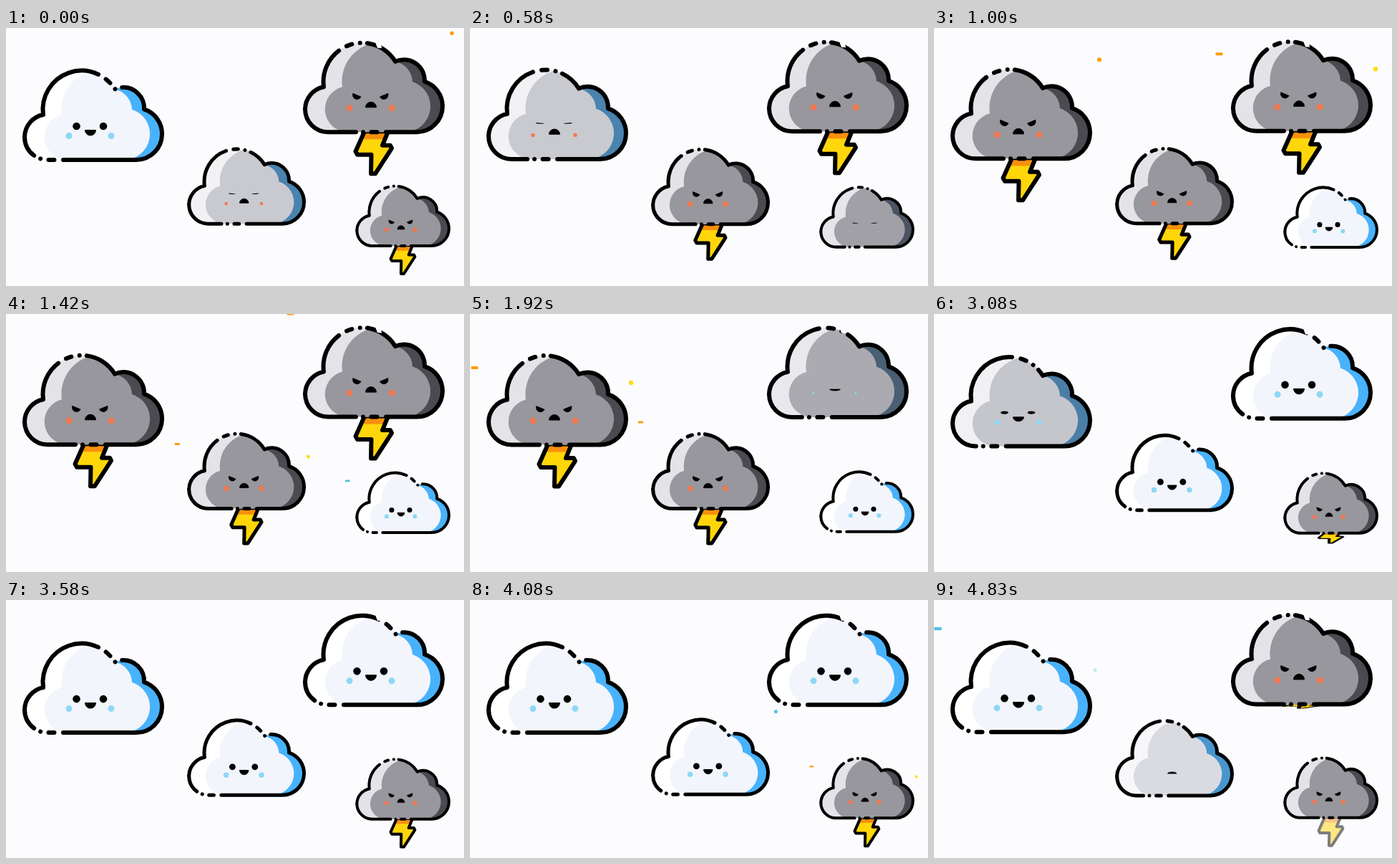
Animation, 640 px wide and 360 px high, one loop 4.91 s. Source, as an HTML page:

```html
<!DOCTYPE html>
<html lang="en">
<head>
<meta charset="utf-8">
<title>Moody clouds</title>
<style>
html, body { margin: 0; width: 100%; height: 100%; overflow: hidden; background: #fcfcfe; }
svg { display: block; width: 100vw; height: 100vh; }
.line { fill: none; stroke: #000; stroke-width: 6; stroke-linecap: round; stroke-linejoin: round; }
</style>
</head>
<body>
<svg id="stage" viewBox="0 0 640 360">
  <defs>
    <clipPath id="body"><path d="M58 185A32 32 0 0 1 52 122A54.2 54.2 0 0 1 152 86.5A29 29 0 0 1 193 114.5A36 36 0 0 1 182 185Z"/></clipPath>
    <path id="zap" d="M109 184H142L134 203.500H145L147 207.500L124 243H118L118.500 216.500H99L96.500 212Z"/>
    <clipPath id="zapClip"><use href="#zap"/></clipPath>
  </defs>
</svg>
<script>
const LOOP = 4910, STEP = 1000 / 12, COUNT = 59, TAU = 2 * Math.PI;
const stage = document.getElementById('stage');

// place, scale, frames of turning angry and calming down, vertical sway
const clouds = [
  { x: 0, y: -1.3, s: 1, mad: 1, calm: 31, amp: 1.5, cycles: 1, peak: 46 },
  { x: 233.9, y: 117.6, s: .8375, mad: 53, calm: 26, amp: 1.3, cycles: 2, peak: 5 },
  { x: 392, y: -40, s: 1, mad: 48.7, calm: 18.5, amp: 1.4, cycles: 1, peak: 46 },
  { x: 472.9, y: 180.8, s: .67, mad: 27.4, calm: 3, amp: 1.2, cycles: 2, peak: 10.5 }
];

// place, size and the moment each one pops in either mood
const sparks = [
  { x: 5.5, y: 41, w: 11, h: 4.5, mad: 28, calm: 26.5 },
  { x: 6.5, y: 77.5, w: 10, h: 4, mad: 22.3, calm: 14 },
  { x: 225, y: 98.5, w: 6.6, h: 6.6, mad: 22.3, calm: 26 },
  { x: 231, y: 47, w: 6, h: 6, mad: 11, calm: 23 }
];

// sunny and stormy colour of each part
const tints = {
  hi: [[255, 255, 255], [227, 227, 232]],
  main: [[242, 245, 251], [152, 151, 157]],
  shade: [[72, 178, 253], [75, 74, 80]]
};

const mod = (a, n) => ((a % n) + n) % n;
const clamp = (v, a, b) => Math.max(a, Math.min(b, v));
const ramp = (t, a, b) => clamp((t - a) / (b - a), 0, 1);
const smooth = u => u * u * (3 - 2 * u);
const set = (e, o) => { for (const n in o) e.setAttribute(n, o[n]); };

// -1 happy, 1 angry; parts vanish while they cross zero
function mood(t, zero, speed) {
  const v = clamp((t - zero) * speed, -1, 1);
  return Math.abs(v) < .13 ? 0 : v;
}

const rise = t => ({
  slide: smooth(ramp(t, .5, 9)),
  tint: ramp(t, 3.5, 9),
  eyes: mood(t, 5.4, .3),
  mouth: mood(t, 4.4, .6),
  cheeks: mood(t, 5, .6)
});
const fall = t => ({
  slide: 1 - smooth(ramp(t, 0, 10)),
  tint: 1 - ramp(t, 3.5, 8.5),
  eyes: mood(t, 4.7, -.3),
  mouth: mood(t, 3.7, -.35),
  cheeks: mood(t, 3.5, -.32)
});

const markup = `
  <g data-k="bolt">
    <g clip-path="url(#zapClip)"><rect x="90" y="180" width="64" height="70" fill="#ffd60a"/>
    <rect x="90" y="180" width="64" height="15" fill="#f8900c"/></g>
    <use href="#zap" class="line"/>
  </g>
  <g clip-path="url(#body)">
    <rect data-k="hi" x="20" y="50" width="122" height="140"/>
    <rect data-k="shade" x="140" y="50" width="85" height="140"/>
    <path data-k="main" d="M84 185A32 32 0 0 1 78 122A54.2 54.2 0 0 1 131 60V40L152 60V86.500A30 30 0 0 1 176 114.700A36 36 0 0 1 165 185Z"/>
  </g>
  <path data-k="top" class="line" d="M26 153A32 32 0 0 1 52 122A54.2 54.2 0 0 1 152 86.5A29 29 0 0 1 193 114.5A36 36 0 0 1 218 149"/>
  <path data-k="base" class="line" d="M218 149A36 36 0 0 1 182 185H58A32 32 0 0 1 26 153"/>
  <g data-k="left"></g><g data-k="right"></g>
  <path data-k="mouth" stroke="#000" stroke-linejoin="round"/>
  <circle data-k="c0" cx="88" cy="151.5"/><circle data-k="c1" cx="147" cy="151.5"/>
  ${sparks.map((p, i) => `<rect data-k="p${i}" rx="${i < 2 ? 1.2 : p.w / 2}"/>`).join('')}`;
const dotEye = '<circle r="5.3"/>';
const madEye = '<path d="M-6 -4.500L6 .5A6.500 6.500 0 0 1 -6 -4.500Z"/>';
const smile = 'M-7.500 -3.500H7.500A7.500 7.500 0 0 1 -7.500 -3.500Z';
const frown = 'M-7.500 3.500A7.500 7.500 0 0 1 7.500 3.500Z';

for (const c of clouds) {
  c.g = document.createElementNS('http://www.w3.org/2000/svg', 'g');
  c.g.innerHTML = markup;
  c.el = {};
  c.g.querySelectorAll('[data-k]').forEach(e => c.el[e.dataset.k] = e);
  stage.append(c.g);
}
// small nick in the outline of the big right-hand cloud
clouds[2].g.insertAdjacentHTML('beforeend', '<path d="M123 57L132 62L133 68L127 67.500Z" fill="#fcfcfe"/>');

function drawBolt(el, angry, t, left) {
  const grow = angry ? ramp(t, 9.2, 10.3) : 0;
  const h = grow && Math.max(.1, grow);
  const pale = left < 5 && Math.floor(left) % 4 === 0; // flickers before it goes out
  set(el, {
    transform: `translate(0 ${185 * (1 - h)}) scale(1 ${h})`,
    opacity: pale ? .5 : 1,
    visibility: h ? 'visible' : 'hidden'
  });
}

function drawFace(el, { eyes, mouth, cheeks }) {
  [['left', 98.5, 1], ['right', 136, -1]].forEach(([n, x, flip]) => {
    const shape = eyes > 0 ? madEye : dotEye;
    if (el[n].shape !== shape) el[n].innerHTML = el[n].shape = shape;
    const y = eyes > 0 ? 135 : 138;
    set(el[n], { transform: `translate(${x} ${y}) scale(${flip} ${Math.abs(eyes)})` });
  });
  set(el.mouth, {
    d: mouth > 0 ? frown : smile,
    transform: `translate(118 147) scale(1 ${Math.abs(mouth)})`,
    visibility: mouth ? 'visible' : 'hidden'
  });
  for (const n of ['c0', 'c1']) set(el[n], { r: 4.5 * Math.abs(cheeks), fill: cheeks > 0 ? '#ef7850' : '#8ed7f5' });
}

function drawSparks(el, angry, t) {
  sparks.forEach((p, i) => {
    const d = (t - (angry ? p.mad : p.calm)) / 1.4;
    const z = Math.abs(d) < 1 ? .6 + .4 * Math.cos(d * Math.PI / 2) : 0;
    const w = p.w * z, h = p.h * z, round = i === 2;
    set(el['p' + i], {
      x: p.x - w / 2, y: p.y - h / 2, width: w, height: h,
      fill: angry ? (round ? '#ffdc1c' : '#ff9a08') : (round ? '#c4eaf5' : '#4fc0dd')
    });
  });
}

function drawCloud(c, f) {
  const { el } = c;
  const k = mod(f - c.mad, COUNT), r = mod(f - c.calm, COUNT);
  const angry = k < r, t = angry ? k : r;
  const look = angry ? rise(t) : fall(t);

  const sway = c.amp * Math.cos(TAU * c.cycles * (f - c.peak) / COUNT);
  set(c.g, { transform: `translate(${c.x} ${c.y + sway}) scale(${c.s})` });

  for (const n in tints) {
    const [a, b] = tints[n];
    set(el[n], { fill: `rgb(${a.map((v, i) => Math.round(v + (b[i] - v) * look.tint))})` });
  }

  // a dash and a dot travel along both halves of the outline
  const dash = d => `${d - 32} 12.5 8 11.5 .01 10 999 0`;
  set(el.top, { 'stroke-dasharray': dash(192 - 59 * look.slide) });
  set(el.base, { 'stroke-dasharray': dash(190.5 - 59 * look.slide) });

  drawBolt(el.bolt, angry, t, COUNT - r);
  drawFace(el, look);
  drawSparks(el, angry, t);
}

function draw(ms) {
  const f = Math.min(COUNT - 1, Math.floor((mod(ms, LOOP) + 4) / STEP));
  clouds.forEach(c => drawCloud(c, f));
}

const start = performance.now();
function tick() {
  draw(performance.now() - start);
  requestAnimationFrame(tick);
}
tick();
</script>
</body>
</html>
```
